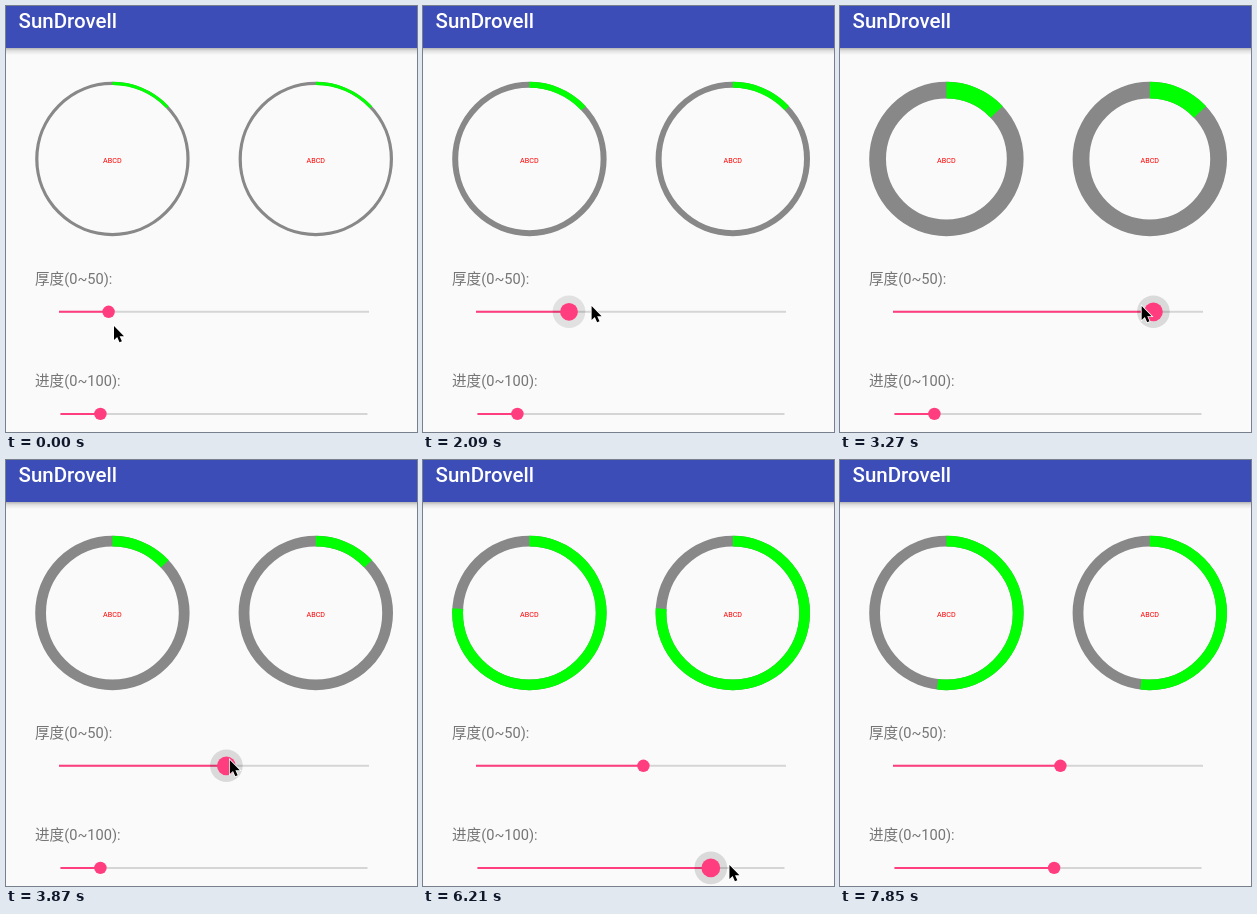
Animation, 411 px wide and 426 px high, one loop 8.47 s. Source, as an HTML page:

```html
<!DOCTYPE html>
<html lang="zh">
<head>
<meta charset="utf-8">
<style>
  html, body { margin: 0; width: 100%; height: 100%; overflow: hidden; background: #fafafa; }
  svg { display: block; width: 411px; height: 426px; }
  text { font-family: Roboto, "Noto Sans CJK SC", "Noto Sans CJK", sans-serif; }
  .title { font-size: 20.5px; font-weight: 500; fill: #fff; }
  .label { font-size: 14.6px; fill: #757575; }
  .ring-text { font-size: 7.2px; fill: #f00; text-anchor: middle; }
  .base, .arc { fill: none; }
  .base { stroke: #888; }
  .arc { stroke: #0f0; }
  .track { stroke: #d5d5d5; stroke-width: 2; }
  .filled { stroke: #ff3d7f; stroke-width: 2; }
  .thumb { fill: #ff3d7f; }
</style>
</head>
<body>
<svg viewBox="0 0 411 426">
  <defs>
    <linearGradient id="shade" x2="0" y2="1">
      <stop stop-opacity=".28"/>
      <stop offset=".4" stop-opacity=".1"/>
      <stop offset="1" stop-opacity="0"/>
    </linearGradient>
  </defs>
  <rect width="411" height="426" fill="#fafafa"/>
  <rect y="42" width="411" height="7" fill="url(#shade)"/>
  <rect width="411" height="42" fill="#3d4db7"/>
  <text class="title" x="12.5" y="21.5">SunDrovell</text>
  <g id="rings"></g>
  <text class="label" x="29" y="278">厚度(0~50):</text>
  <text class="label" x="29" y="380">进度(0~100):</text>
  <g id="sliders"></g>
  <path id="cursor" d="M0 0V14L3.2 11 5.5 16.3 7.9 15.3 5.6 10.3H10Z"
        stroke="#fff" stroke-width="1.6" paint-order="stroke"/>
</svg>
<script>
const LOOP = 8470, STEP = 147.8, LAST_STEP = 53;
const RADIUS = 77.2;
const LEAD = .8; // steps by which the pointer runs ahead of the thumb
const $ = id => document.getElementById(id);

function ease(from, to, step) {
  const u = Math.min(1, Math.max(0, (step - from) / (to - from)));
  return u * u * (3 - 2 * u);
}

function set(node, attrs) {
  for (const key in attrs) node.setAttribute(key, attrs[key]);
}

function add(parent, name, attrs) {
  const node = document.createElementNS("http://www.w3.org/2000/svg", name);
  set(node, attrs);
  return parent.appendChild(node);
}

function makeRing(x) {
  const y = 153, circle = { cx: x, cy: y, pathLength: 100, transform: `rotate(-90 ${x} ${y})` };
  const base = add($("rings"), "circle", { class: "base", ...circle });
  const arc = add($("rings"), "circle", { class: "arc", ...circle });
  add($("rings"), "text", { class: "ring-text", x, y: 157.3 }).textContent = "ABCD";
  return (width, percent) => {
    const shape = { r: RADIUS - width / 2, "stroke-width": width };
    set(base, shape);
    set(arc, { ...shape, "stroke-dasharray": `${percent} 100` });
  };
}

function makeSlider(x1, x2, y, max, valueAt, pressAt) {
  const group = $("sliders"), line = { x1, x2, y1: y, y2: y };
  add(group, "line", { class: "track", ...line });
  const filled = add(group, "line", { class: "filled", ...line });
  const halo = add(group, "circle", { cy: y, r: 16.3 });
  const thumb = add(group, "circle", { class: "thumb", cy: y });
  const position = value => x1 + (x2 - x1) * value / max;
  return {
    travel: step => position(valueAt(step)) - position(valueAt(0)),
    draw(step) {
      const value = Math.round(valueAt(step)), x = position(value), press = pressAt(step);
      set(filled, { x2: x });
      set(halo, { cx: x, "fill-opacity": .13 * press ** 1.5 });
      set(thumb, { cx: x, r: 6.2 + 3.2 * press });
      return value;
    }
  };
}

const rings = [106.4, 309.8].map(makeRing);
const thickness = makeSlider(53, 363, 305.8, 50,
  step => 8 + 34 * ease(10.9, 21.7, step) - 15 * ease(21.7, 26, step),
  step => ease(11, 15, step) - ease(27, 29, step));
const progress = makeSlider(54.5, 361.5, 407.9, 100,
  step => 13 + 70 * ease(36, 43.5, step) - 31 * ease(43.5, 48.6, step),
  step => ease(37, 40, step) - ease(48, 50, step));

// The pointer reaches each thumb, drags it, then leaves through the bottom edge.
function pointerAt(step) {
  const move = (from, to, distance) => distance * ease(from, to, step);
  const drag = thickness.travel(step + LEAD) + progress.travel(step + LEAD);
  const x = 108 + move(0, 4, -10) + drag + move(10, 13, 8) + move(26, 34, -133)
    + move(35, 38, 6) + move(48, 51, -5) + move(51, 53, 82);
  const y = 320 + move(0, 4, -15) + move(10, 14, -5) + move(26, 33.5, 105)
    + move(43, 47, -4) + move(48, 51, -3) + move(51, 53, 34);
  return [x, y];
}

function draw(time) {
  const step = Math.min(LAST_STEP, Math.floor(time % LOOP / STEP));
  const width = thickness.draw(step) * .4, percent = progress.draw(step);
  rings.forEach(ring => ring(width, percent));
  set($("cursor"), { transform: `translate(${pointerAt(step)})` });
}

const start = performance.now();
function tick() {
  draw(performance.now() - start);
  requestAnimationFrame(tick);
}
tick();
</script>
</body>
</html>
```
